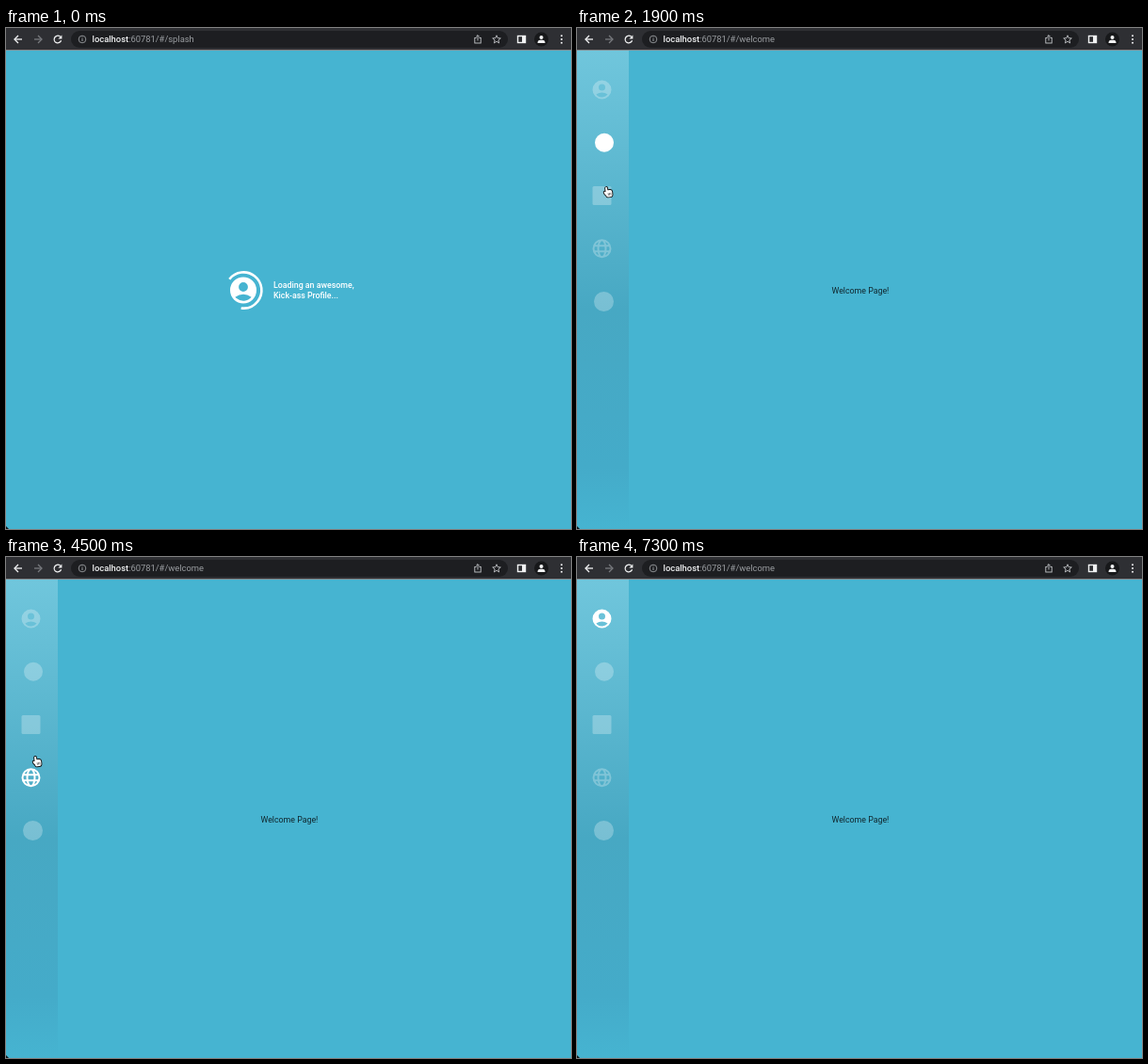
Recreate the animation shown at these times as an HTML page with a canvas. Size 600 by 532 pixels, loop 7.4 s.

```html
<!DOCTYPE html>
<html lang="en">
<head>
<meta charset="utf-8">
<title>Profile sidebar</title>
<style>
  html, body { margin: 0; width: 100%; height: 100%; overflow: hidden; background: #46b4d1; }
  canvas { display: block; width: 600px; height: 532px; }
</style>
</head>
<body>
<canvas id="stage" width="600" height="532"></canvas>
<script>
const ctx = document.getElementById('stage').getContext('2d');
const LOOP = 7400, STEP = 100, W = 600, H = 532, BAR = 24;
const SKY = '#46b4d1', TAU = Math.PI * 2;
const ARRIVE = 300, SETTLED = 600;          // page transition
const ENTER = 1000, LEAVE = 6500;           // pointer visible
const TOUR_START = 780, LEG = 670;          // one click at the end of each leg
const tour = [1.5, 1, 2, 3, 4, 3, 2, 1, 0]; // menu rows visited

const clamp = v => Math.max(0, Math.min(1, v));
const ease = v => { const p = clamp(v); return p * p * (3 - 2 * p); };
const rowY = i => 65.5 + 56.25 * i;

function stateAt(t) {
  const last = tour.length - 1;
  const legs = Math.max(0, (t - TOUR_START) / LEG);
  const leg = Math.min(last, Math.floor(legs)), p = legs - leg;
  const from = tour[leg], to = tour[Math.min(last, leg + 1)];
  const visible = t >= ENTER && t < LEAVE;
  const row = from + (to - from) * ease((p - 0.45) / 0.27);
  const inward = ease((t - ENTER) / 450) - ease((t - 6200) / 400);
  return {
    visible,
    active: leg ? from : 0,
    hover: !visible ? -1 : p < 0.55 ? from : p > 0.73 ? to : -1,
    x: 9 + 24 * inward,
    y: rowY(row) + 1,
    offset: t < SETTLED ? 343 * 7 ** ((ARRIVE - t) / 100) : 0
  };
}

function line(points, color, width = 1.2, close = false) {
  ctx.beginPath();
  points.forEach(([x, y]) => ctx.lineTo(x, y));
  if (close) ctx.closePath();
  ctx.strokeStyle = color;
  ctx.lineWidth = width;
  ctx.stroke();
}

function triangle(x, y, dx, dy, color) {
  ctx.beginPath();
  ctx.moveTo(x, y);
  ctx.lineTo(x + dx, y);
  ctx.lineTo(x, y + dy);
  ctx.fillStyle = color;
  ctx.fill();
}

function disc(x, y, r, color) {
  ctx.beginPath();
  ctx.arc(x, y, r, 0, TAU);
  ctx.fillStyle = color;
  ctx.fill();
}

function ring(x, y, r, color, width, from = 0, to = TAU) {
  ctx.beginPath();
  ctx.arc(x, y, r, from, to);
  ctx.strokeStyle = color;
  ctx.lineWidth = width;
  ctx.stroke();
}

function box(x, y, w, h, r, color) {
  ctx.beginPath();
  ctx.roundRect(x, y, w, h, r);
  ctx.fillStyle = color;
  ctx.fill();
}

function text(str, x, y, size, color, weight = 400) {
  ctx.font = `${weight} ${size}px Roboto, sans-serif`;
  ctx.fillStyle = color;
  ctx.fillText(str, x, y);
  return ctx.measureText(str).width;
}

function person(x, y, scale, color) {
  const low = Math.atan2(5.1, 6.15);
  ctx.save();
  ctx.translate(x, y);
  ctx.scale(scale, scale);
  ctx.beginPath();
  ctx.arc(0, 0, 10, 0, TAU);
  ctx.moveTo(3.5, -2.5);
  ctx.arc(0, -2.5, 3.5, 0, TAU);
  ctx.moveTo(-6.15, 5.1);
  ctx.quadraticCurveTo(0, 1, 6.15, 5.1);
  ctx.arc(0, 0, 8, low, Math.PI - low);
  ctx.closePath();
  ctx.fillStyle = color;
  ctx.fill('evenodd');
  ctx.restore();
}

function globe(x, y, color) {
  ctx.beginPath();
  ctx.arc(x, y, 9, 0, TAU);
  ctx.moveTo(x + 4, y);
  ctx.ellipse(x, y, 4, 9, 0, 0, TAU);
  for (const dy of [-3, 3]) {
    ctx.moveTo(x - 8.5, y + dy);
    ctx.lineTo(x + 8.5, y + dy);
  }
  ctx.strokeStyle = color;
  ctx.lineWidth = 2;
  ctx.stroke();
}

const icons = [
  (y, c) => person(26.5, y, 1, c),
  (y, c) => disc(29, y, 10, c),
  (y, c) => box(16.5, y - 10, 20, 20, 1.5, c),
  (y, c) => globe(26.5, y, c),
  (y, c) => disc(28.5, y, 10.5, c)
];

function drawSplash(t, shift) {
  const start = (-142 + t * 0.3) * Math.PI / 180;
  ctx.save();
  ctx.translate(-shift, 0);
  ring(252.3, 278.5, 19.1, '#fff', 2.6, start, start + TAU * 2 / 3);
  person(252, 278.5, 1.4, '#fff');
  text('Loading an awesome,', 284, 276, 8.8, '#fff', 500);
  text('Kick-ass Profile...', 284, 287, 8.8, '#fff', 500);
  ctx.restore();
}

function drawSidebar(state) {
  const fade = ctx.createLinearGradient(0, BAR, 0, H);
  fade.addColorStop(0, '#70c6dc');
  fade.addColorStop(0.54, '#47a8c3');
  fade.addColorStop(0.87, '#44abc9');
  fade.addColorStop(1, SKY);
  ctx.fillStyle = fade;
  ctx.fillRect(0, BAR, 55, H - BAR);

  icons.forEach((icon, i) => {
    if (i === state.hover) disc(27, rowY(i), 22.5, 'rgba(110,140,140,0.17)');
    icon(rowY(i), i === state.active ? '#fff' : 'rgba(255,255,255,0.27)');
  });
}

function drawPage(state) {
  ctx.save();
  ctx.translate(state.offset, 0);
  if (state.offset) {
    const shade = ctx.createLinearGradient(-30, 0, 0, 0);
    shade.addColorStop(0, 'rgba(0,0,0,0)');
    shade.addColorStop(1, 'rgba(0,0,0,0.05)');
    ctx.fillStyle = shade;
    ctx.fillRect(-30, BAR, 30, H - BAR);
  }
  ctx.fillStyle = SKY;
  ctx.fillRect(0, BAR, W, H - BAR);
  drawSidebar(state);
  text('Welcome Page!', 270.5, 282, 8.8, '#10252c');
  ctx.restore();
}

function drawArrow(x, dir, color) {
  const tip = x + 4 * dir;
  line([[x - 4 * dir, 12], [tip, 12]], color, 1.3);
  line([[x, 8], [tip, 12], [x, 16]], color, 1.3);
}

function drawBar(route) {
  const light = '#f1f2f3', grey = '#9a9da1', pale = '#c4c7ca';
  ctx.fillStyle = '#2e2f33';
  ctx.fillRect(0, 0, W, BAR);
  ctx.fillStyle = '#85898c';
  ctx.fillRect(0, BAR - 1, W, 1);
  box(69, 3, 464, 18, 9, '#1d1e21');

  drawArrow(13, -1, light);
  drawArrow(34, 1, '#77797d');
  ring(55, 12, 3.8, light, 1.3, 0.35, TAU - 0.8);
  triangle(59.4, 11.4, -4, -4, light);

  ring(81, 12, 3.8, grey, 0.9);
  box(80.5, 11.3, 1, 2.7, 0, grey);
  box(80.5, 9.7, 1, 0.9, 0, grey);
  const width = text('localhost', 91.5, 15, 9.4, light, 500);
  text(':60781/#/' + route, 91.5 + width, 15, 9.4, grey);

  ctx.strokeStyle = pale;
  ctx.lineWidth = 0.9;
  ctx.strokeRect(497.8, 10.5, 6.4, 5.5);
  box(499.5, 9, 3, 2.2, 0, '#1d1e21');
  line([[501, 13.5], [501, 7.8]], pale, 0.9);
  line([[499.2, 9.4], [501, 7.6], [502.8, 9.4]], pale, 0.9);
  const star = Array.from({ length: 10 }, (_, i) => {
    const a = i * Math.PI / 5, r = i % 2 ? 2 : 4.5;
    return [521 + r * Math.sin(a), 12.3 - r * Math.cos(a)];
  });
  line(star, pale, 0.9, true);

  ctx.strokeStyle = light;
  ctx.lineWidth = 1.4;
  ctx.strokeRect(543.5, 8.5, 8, 7);
  box(548, 8, 4, 8, 0, light);
  disc(568.5, 12, 7.5, '#17181a');
  disc(568.5, 10, 2, light);
  box(564.5, 12.8, 8, 3.2, [3, 3, 0, 0], light);
  for (let i = -1; i <= 1; i++) disc(590, 12 + 3.7 * i, 1, light);
}

function drawHand(x, y) {
  ctx.save();
  ctx.translate(x, y);
  ctx.rotate(-0.12);
  ctx.beginPath();
  ctx.roundRect(-2.4, -5.4, 2, 8, 1);
  ctx.roundRect(-2.4, -2, 6.6, 7.2, [1, 2, 2.5, 2]);
  ctx.ellipse(-2.6, 1.4, 1.1, 2.6, -0.6, 0, TAU);
  ctx.strokeStyle = '#101010';
  ctx.lineWidth = 1.8;
  ctx.stroke();
  ctx.fillStyle = '#fff';
  ctx.fill();
  for (let i = 0; i < 3; i++) box(-0.4 + 1.4 * i, 1, 0.6, 2.6, 0, '#333');
  ctx.restore();
}

function draw(t) {
  const state = stateAt(t), arrived = t >= ARRIVE;
  ctx.fillStyle = SKY;
  ctx.fillRect(0, 0, W, H);
  if (state.offset) drawSplash(t, arrived ? (W - state.offset) * 0.34 : 0);
  if (arrived) drawPage(state);
  drawBar(arrived ? 'welcome' : 'splash');
  if (state.visible) drawHand(state.x, state.y);
  triangle(0, H, 3, -3, '#101416');
}

const began = performance.now();
function tick() {
  const t = (performance.now() - began) % LOOP;
  draw(Math.floor(t / STEP) * STEP);
  requestAnimationFrame(tick);
}
tick();
</script>
</body>
</html>
```
